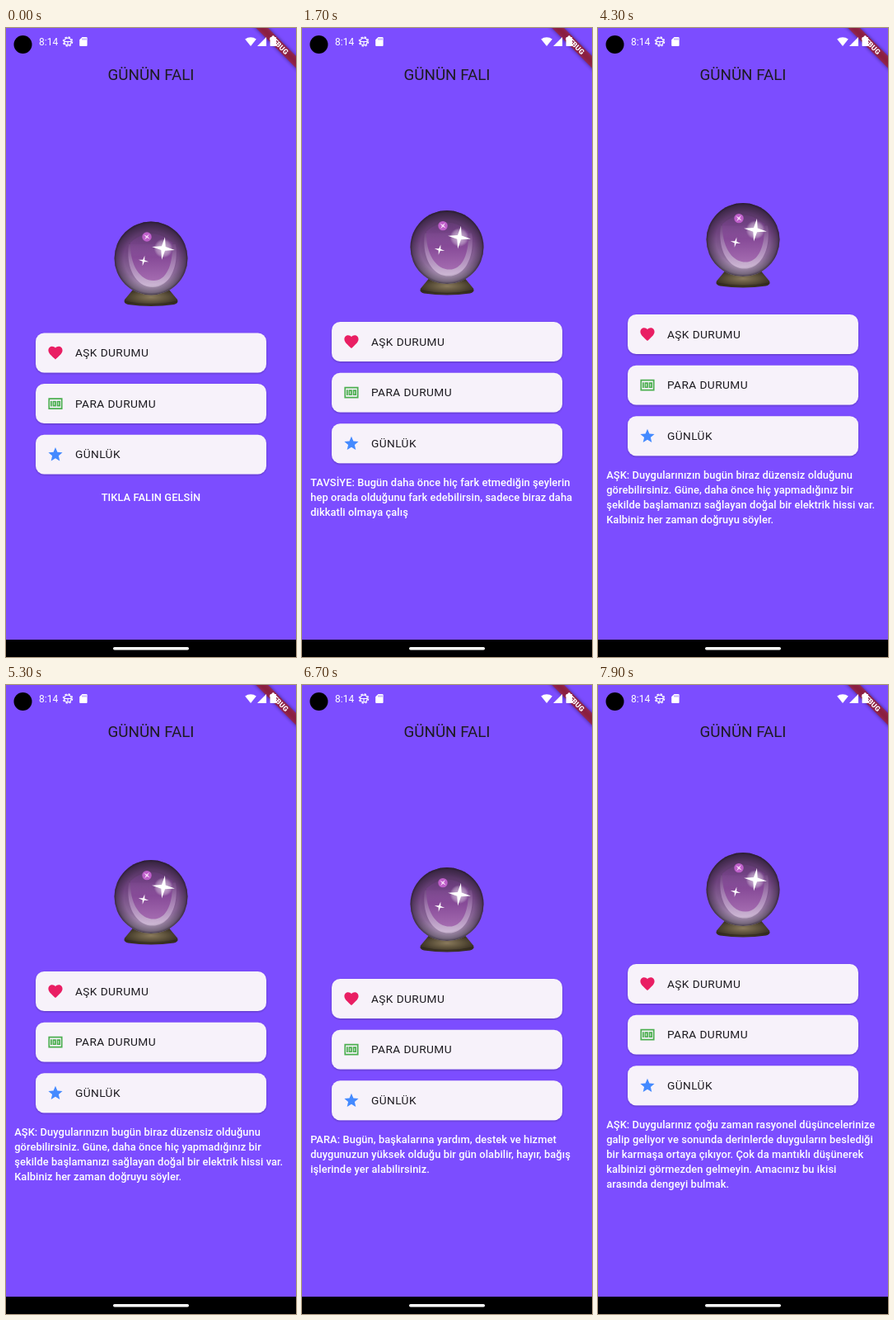
An HTML page that plays this animation: 352 px wide and 762 px high, repeating every 8000 ms.

```html
<!DOCTYPE html>
<html lang="tr">
<head>
<meta charset="utf-8">
<title>Günün Falı</title>
<style>
  html, body { margin: 0; width: 100%; height: 100%; overflow: hidden; background: #7c4dff; }
  svg { display: block; width: 352px; height: 762px; }
  text { font-family: Roboto, sans-serif; }
  .title { font-size: 18.8px; fill: #1d1b20; }
  .label { font-size: 13.7px; letter-spacing: .43px; fill: #1d1b20; }
  .advice { font-size: 12.85px; font-weight: 500; letter-spacing: .086px; fill: #fff; }
  .clock { font-size: 12px; fill: #fff; }
  .ribbon { font-size: 8.7px; font-weight: 900; fill: #fff; }
</style>
</head>
<body>
<svg viewBox="0 0 352 762">
  <defs>
    <linearGradient id="glass" x1="0" y1="0" x2="0" y2="1">
      <stop offset="0" stop-color="#4b2f58"/>
      <stop offset=".4" stop-color="#704480"/>
      <stop offset=".72" stop-color="#8c6b99"/>
      <stop offset="1" stop-color="#b8a8bf"/>
    </linearGradient>
    <radialGradient id="rim">
      <stop offset=".74" stop-color="#241a2b" stop-opacity="0"/>
      <stop offset=".93" stop-color="#241a2b" stop-opacity=".42"/>
      <stop offset="1" stop-color="#1d1522" stop-opacity=".75"/>
    </radialGradient>
    <linearGradient id="crescent" x1="0" y1="0" x2="0" y2="1">
      <stop offset="0" stop-color="#c9a0d6" stop-opacity=".1"/>
      <stop offset=".5" stop-color="#c4a0d0" stop-opacity=".6"/>
      <stop offset="1" stop-color="#dcc8e2" stop-opacity=".75"/>
    </linearGradient>
    <linearGradient id="inner" x1="0" y1="0" x2="0" y2="1">
      <stop offset="0" stop-color="#74408a" stop-opacity=".3"/>
      <stop offset=".5" stop-color="#864a97"/>
      <stop offset="1" stop-color="#a46bb0"/>
    </linearGradient>
    <radialGradient id="wood" cx=".5" cy=".45" r=".55">
      <stop offset="0" stop-color="#8a7a5c"/>
      <stop offset=".5" stop-color="#60543d"/>
      <stop offset="1" stop-color="#352d20"/>
    </radialGradient>
    <radialGradient id="glow">
      <stop offset="0" stop-color="#fff" stop-opacity=".75"/>
      <stop offset=".75" stop-color="#d8c4de" stop-opacity=".42"/>
      <stop offset="1" stop-color="#d8c4de" stop-opacity="0"/>
    </radialGradient>
    <filter id="soft" x="-20%" y="-60%" width="140%" height="220%">
      <feGaussianBlur stdDeviation="2"/>
    </filter>
    <filter id="lift" x="-5%" y="-10%" width="110%" height="130%">
      <feDropShadow dx="0" dy=".9" stdDeviation=".8" flood-color="#000" flood-opacity=".28"/>
    </filter>
    <path id="spark" d="M0-1L.17-.17 1 0 .17.17 0 1-.17.17-1 0-.17-.17Z"/>
  </defs>

  <rect width="352" height="762" fill="#7c4dff"/>
  <text class="title" x="176" y="63" text-anchor="middle">GÜNÜN FALI</text>

  <g id="group">
    <g id="ball">
      <path d="M154 317L144 329Q142 333.5 148 335Q176 339 204 335Q210 333.5 208 329L198 317Z" fill="url(#wood)"/>
      <path d="M145 331.5Q176 338 207 331.5" fill="none" stroke="#241f17" stroke-opacity=".5"/>
      <circle cx="176" cy="279" r="44.5" fill="url(#glass)"/>
      <path d="M149 262C145 291 158 314 178 314S210 290 206 262Z" fill="url(#crescent)"/>
      <path d="M151 260C150 286 162 306 179 306S203 284 202 260Q176 238 151 260Z" fill="url(#inner)"/>
      <circle cx="176" cy="279" r="44.5" fill="url(#rim)"/>
      <circle cx="191" cy="267" r="11.5" fill="url(#glow)"/>
      <use href="#spark" transform="translate(191 267) rotate(8) scale(14)" fill="#fff"/>
      <use href="#spark" transform="translate(167 282) rotate(12) scale(6.3)" fill="#fff"/>
      <circle cx="171" cy="253" r="5.7" fill="#be5fc9"/>
      <use href="#spark" transform="translate(171 253) rotate(38) scale(4.6)" fill="#f6dcf8"/>
    </g>
  </g>
  <g id="advice"></g>

  <!-- corner ribbon -->
  <g transform="translate(352 0) rotate(45)">
    <rect x="-50" y="24" width="100" height="10.3" fill="#000" opacity=".5" filter="url(#soft)"/>
    <rect x="-50" y="24" width="100" height="10.3" fill="#b71c1c" fill-opacity=".63"/>
    <text class="ribbon" x="0" y="32.2" text-anchor="middle">DEBUG</text>
  </g>

  <!-- status bar -->
  <circle cx="20.5" cy="20" r="11" fill="#000"/>
  <text class="clock" x="40" y="21">8:14</text>
  <g fill="none" stroke="#fff">
    <circle cx="75" cy="16.5" r="5.6" stroke-width="1.3" stroke-dasharray="2.4 2"/>
    <circle cx="75" cy="16.5" r="4.3" stroke-width="1.3"/>
    <path d="M71 16.5H79M75 16.5V20.5" stroke-width="1.1"/>
  </g>
  <path d="M92.5 11H97.5Q98.6 11 98.6 12V21Q98.6 22 97.5 22H90.2Q89.2 22 89.2 21V14.3Z" fill="#fff"/>
  <path d="M93 12.5V14.5M95 12.5V14.5M97 12.5V14.5" stroke="#7c4dff" stroke-width=".8"/>
  <g fill="#fff">
    <path d="M297 22L290.2 13.6A11 11 0 0 1 303.8 13.6Z"/>
    <path d="M305 22H316V11Z"/>
    <path d="M322.8 9.8H325.6V11H327.2Q328 11 328 11.8V21.2Q328 22 327.2 22H321.3Q320.5 22 320.5 21.2V11.8Q320.5 11 321.3 11H322.8Z"/>
  </g>

  <!-- navigation bar -->
  <rect y="741" width="352" height="21" fill="#000"/>
  <rect x="130" y="750" width="92" height="3.4" rx="1.7" fill="#fff"/>
</svg>
<script>
const LOOP = 8000;
const LINE = 18;
const TILE_TOP = 369.5, TILE_H = 47.9, TILE_STEP = 61.6;

const tiles = [
  ['AŞK DURUMU', '#e91e63', 'M12 21.35l-1.45-1.32C5.4 15.36 2 12.28 2 8.5 2 5.42 4.42 3 7.5 3c1.74 0 3.41.81 4.5 2.09C13.09 3.81 14.76 3 16.5 3 19.58 3 22 5.42 22 8.5c0 3.78-3.4 6.86-8.55 11.54z'],
  ['PARA DURUMU', '#4caf50', 'M2 4H22V20H2ZM4 6V18H20V6ZM5 8H7V16H5ZM8 8H13V16H8ZM10 10V14H11V10ZM14 8H19V16H14ZM16 10V14H17V10Z'],
  ['GÜNLÜK', '#448aff', 'M12 17.27L18.18 21l-1.64-7.03L22 9.24l-7.19-.61L12 2 9.19 8.63 2 9.24l5.46 4.73L5.82 21z']
];

// start time, shift of ball and tiles, first baseline, lines
const steps = [
  { at: 0, shift: 0, base: 572.5, centered: true, lines: ['TIKLA FALIN GELSİN'] },
  { at: 1400, shift: -13.4, base: 554.5, lines: [
    'TAVSİYE: Bugün daha önce hiç fark etmediğin şeylerin',
    'hep orada olduğunu fark edebilirsin, sadece biraz daha',
    'dikkatli olmaya çalış'] },
  { at: 4300, shift: -22.4, base: 545.5, lines: [
    'AŞK: Duygularınızın bugün biraz düzensiz olduğunu',
    'görebilirsiniz. Güne, daha önce hiç yapmadığınız bir',
    'şekilde başlamanızı sağlayan doğal bir elektrik hissi var.',
    'Kalbiniz her zaman doğruyu söyler.'] },
  { at: 6700, shift: -13.4, base: 554.5, lines: [
    'PARA: Bugün, başkalarına yardım, destek ve hizmet',
    'duygunuzun yüksek olduğu bir gün olabilir, hayır, bağış',
    'işlerinde yer alabilirsiniz.'] },
  { at: 7500, shift: -31.4, base: 536.5, lines: [
    'AŞK: Duygularınız çoğu zaman rasyonel düşüncelerinize',
    'galip geliyor ve sonunda derinlerde duyguların beslediği',
    'bir karmaşa ortaya çıkıyor. Çok da mantıklı düşünerek',
    'kalbinizi görmezden gelmeyin. Amacınız bu ikisi',
    'arasında dengeyi bulmak.'] }
];

const group = document.getElementById('group');
const advice = document.getElementById('advice');

function add(parent, tag, attrs, text = '') {
  const el = document.createElementNS('http://www.w3.org/2000/svg', tag);
  for (const key in attrs) el.setAttribute(key, attrs[key]);
  el.textContent = text;
  parent.append(el);
  return el;
}

tiles.forEach(([name, color, icon], i) => {
  const y = TILE_TOP + i * TILE_STEP;
  add(group, 'rect', { x: 36, y, width: 280, height: TILE_H, rx: 10.3, fill: '#f7f2fa', filter: 'url(#lift)' });
  add(group, 'path', { d: icon, fill: color, 'fill-rule': 'evenodd', transform: `translate(49.7 ${y + 13.7}) scale(.8565)` });
  add(group, 'text', { class: 'label', x: 83.9, y: y + 28.6 }, name);
});

const blocks = steps.map(({ base, centered, lines }) => {
  const block = add(advice, 'g', { visibility: 'hidden' });
  lines.forEach((line, i) => add(block, 'text', {
    class: 'advice',
    x: centered ? 176 : 10.2,
    y: base + i * LINE,
    'text-anchor': centered ? 'middle' : 'start'
  }, line));
  return block;
});

let shown = -1;
function draw(time) {
  const now = steps.findLastIndex(step => time >= step.at);
  if (now === shown) return;
  shown = now;
  group.setAttribute('transform', `translate(0 ${steps[now].shift})`);
  blocks.forEach((block, i) => block.setAttribute('visibility', i === now ? 'visible' : 'hidden'));
}

const start = performance.now();
function tick() {
  draw((performance.now() - start) % LOOP);
  requestAnimationFrame(tick);
}
tick();
</script>
</body>
</html>
```
